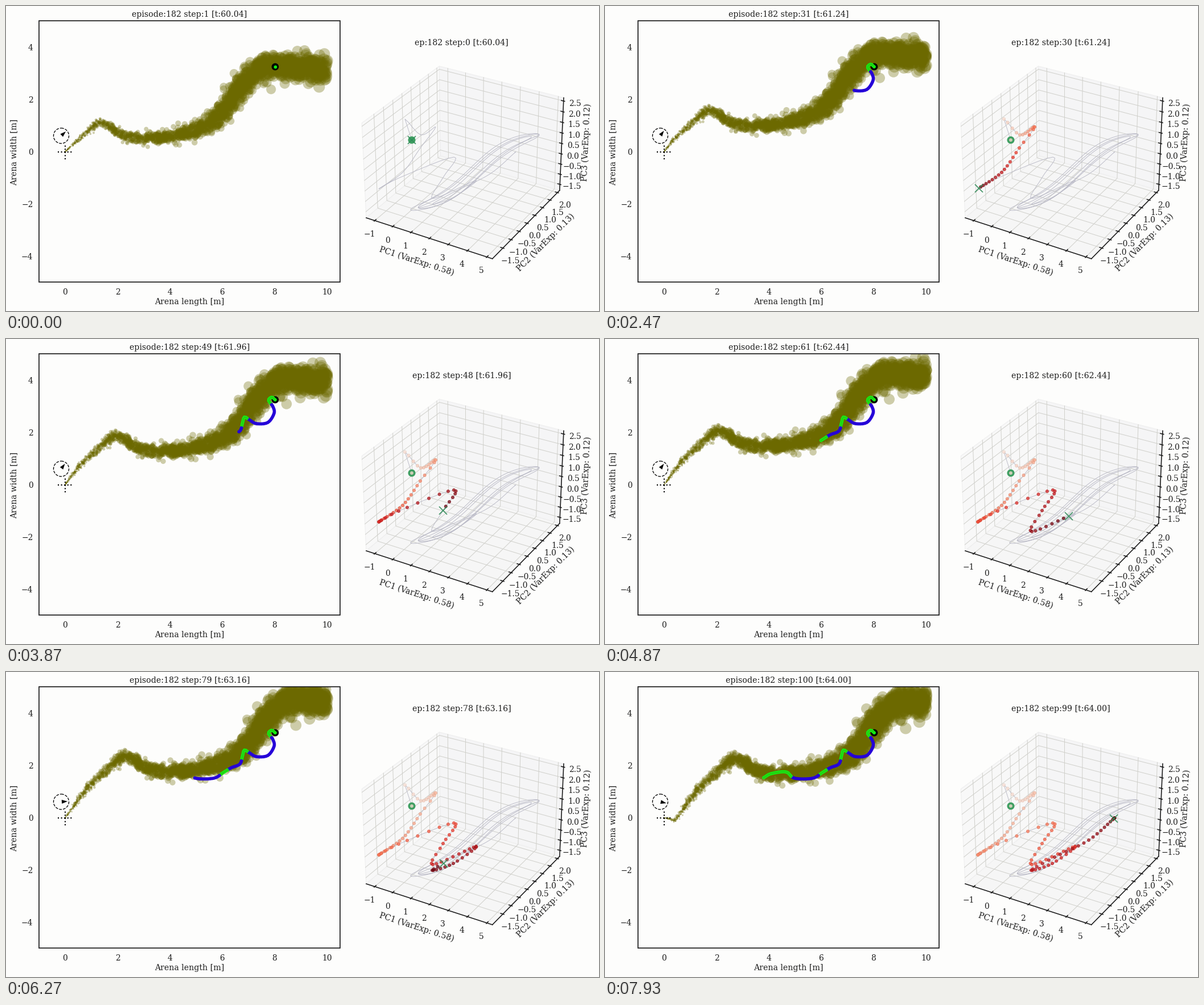
Write a matplotlib script that moves like this. It is 1042 px wide and 537 px high and loops after 8000 ms.

```python
import numpy as np
import matplotlib.pyplot as plt
from matplotlib.animation import FuncAnimation
from matplotlib.patches import Circle, Polygon, Rectangle

W, H, DPI = 1042, 537, 100
STEPS = 100
INK = "#1c1c1c"
GREEN, BLUE = "#12f212", "#2400dc"
SPEED = 0.925                      # wind, pixels per step
ORIGIN = np.array([104.0, 256.5])

plt.rcParams["font.family"] = "DejaVu Serif"
fig = plt.figure(figsize=(W / DPI, H / DPI), dpi=DPI, facecolor="#fdfdfc")
ax = fig.add_axes([0, 0, 1, 1])
ax.set_xlim(0, W)
ax.set_ylim(H, 0)
ax.axis("off")


def pt(px):
    return px * 72 / DPI


def area(radius):
    return pt(2 * np.asarray(radius, float)) ** 2


def label(x, y, s, px=14.1, **kw):
    opts = dict(ha="center", va="center", color=INK, zorder=20)
    opts.update(kw)
    return ax.text(x, y, s, fontsize=pt(px), **opts)


def tick_label(x, y, s, **kw):
    label(x, y + 1.4, s.replace("-", "\u2212"), 13.9, **kw)


def line(points, color, px, **kw):
    points = np.asarray(points)
    return ax.plot(points[:, 0], points[:, 1], color=color, lw=pt(px), **kw)[0]


def lerp(x, xs, points):
    """Linear interpolation of each column of points."""
    return np.column_stack([np.interp(x, xs, col) for col in np.transpose(points)])


def smooth(points, m=12):
    """Catmull-Rom curve through the points."""
    p = np.array(points, float)
    p = np.vstack([2 * p[0] - p[1], p, 2 * p[-1] - p[-2]])
    t = np.linspace(0, 1, m, endpoint=False)[:, None]
    parts = [0.5 * (2 * b + (c - a) * t + (2 * a - 5 * b + 4 * c - d) * t**2
                    + (3 * b - a - 3 * c + d) * t**3)
             for a, b, c, d in zip(p, p[1:], p[2:], p[3:])]
    return np.vstack(parts + [p[-2:-1]])


# ---- arena ----
arena = Rectangle((58, 26), 529, 460, fill=False, ec=INK, lw=pt(1.7), zorder=15)
ax.add_patch(arena)
for v in range(0, 11, 2):
    tick_label(104 + 46 * v, 503, str(v))
for v in range(-4, 5, 2):
    tick_label(47.5, 256.5 - 46 * v, str(v), ha="right")
label(322.5, 520.5, "Arena length [m]")
label(14.5, 257, "Arena width [m]", rotation=90)
title = label(322.5, 15, "")

line([(91, 257), (118, 257)], "black", 2.1, ls=":", zorder=6)
line([(104, 270), (104, 243)], "black", 2.1, ls=":", zorder=6)
HUB = np.array([97, 228.5])
ax.add_patch(Circle(HUB, 13.5, fill=False, ec="black", lw=pt(1.3), ls="--", zorder=6))
arrow = Polygon([(0, 0)] * 3, closed=True, color="black", lw=0, zorder=7)
ax.add_patch(arrow)

# ---- wind: heading in degrees against distance blown, zero at the first step ----
BLOWN = [-560, -445, -420, -395, -330, -300, -270, -225, -190, -142, -126, -88,
         -72, 0, 9, 72, 72.2]
HEADING = [-8, -3, 20, 51, 52, 46, 24, 13, 2, -2, -33, -30, 40, 43, 53, 54, -13]


def heading(blown):
    a = np.radians(np.interp(blown, BLOWN, HEADING))
    return np.stack([np.cos(a), -np.sin(a)], axis=-1)


grid = np.arange(-600, 96, 0.5)
drift = np.cumsum(0.5 * heading(grid), axis=0)

# ---- plume: each puff is carried from the origin by all wind since its release ----
rng = np.random.default_rng(182)
release = rng.uniform(grid[0], STEPS * SPEED, 2600)
jitter = np.clip(rng.normal(size=(release.size, 2)), -2.9, 2.9)
release = np.r_[release, -436, -460]            # two stray puffs
jitter = np.vstack([jitter, (0, 4.3), (0, 3.1)])
origin_drift = lerp(release, grid, drift)

puffs = ax.scatter([], [], color="#6c6900", alpha=0.33, linewidths=0, zorder=2)
puffs.set_clip_path(arena)


def plume(n):
    dist = n * SPEED - release
    age = np.maximum(dist, 0)
    pos = (ORIGIN + lerp([n * SPEED], grid, drift) - origin_drift
           + jitter * (0.2 * age**0.64)[:, None])
    show = (dist >= 0) & (pos[:, 0] < 564.5) & (pos[:, 1] > 26)
    return pos[show], area(0.9 + 0.0175 * age[show])


# ---- agent: constant speed along a curve ----
walk = smooth([(473, 107), (467, 102.5), (461.5, 108), (469, 119), (471, 131),
               (460, 147), (440, 149), (428, 142.5), (419, 137.5), (415.5, 148),
               (411, 162), (396, 168.5), (382, 177), (365, 187), (333, 187),
               (318, 176), (292, 179), (279, 186)])
travelled = np.r_[0, np.cumsum(np.hypot(*np.diff(walk, axis=0).T))]
agent = lerp(np.linspace(0, travelled[-1], STEPS), travelled, walk)
in_odor = np.searchsorted([9.5, 36.5, 45, 56.5, 62, 80.5],
                          np.arange(1, STEPS + 1)) % 2 == 0
ax.add_patch(Circle(agent[0], 6.3, color="black", lw=0, zorder=8))
trail = ax.scatter([], [], s=area(2.9), linewidths=0, zorder=9)
core = ax.scatter([], [], s=area(0.9), linewidths=0, zorder=10)
trail_color = np.where(in_odor, GREEN, BLUE)
core_color = np.where(in_odor, "#3f9d12", "#2a0ccc")

# ---- 3D box, seen from elevation 30 and azimuth -60 ----
LO, HI = np.array([-1.48, -2.12, -1.80]), np.array([5.28, 2.15, 2.65])
BOX = np.array([4, 4, 3]) * 0.28571
el, az = np.radians([30, -60])
RIGHT = np.array([-np.sin(az), np.cos(az), 0])
UP = np.array([-np.sin(el) * np.cos(az), -np.sin(el) * np.sin(az), np.cos(el)])
EYE = np.array([np.cos(el) * np.cos(az), np.cos(el) * np.sin(az), np.sin(el)])


def project(u):
    """Unit-cube points to pixels."""
    q = (np.asarray(u, float) - 0.5) * BOX
    f = 10 / (10 - q @ EYE)
    return np.stack([805.9 + 222.3 * (q @ RIGHT) * f,
                     267.6 - 222.2 * (q @ UP) * f], axis=-1)


def at(axis, t, fixed):
    u = np.array(fixed, float)
    u[axis] = t
    return u


# pane normal, its position, shade
for axis, side, shade in [(0, 0, "#f8f8f8"), (1, 1, "#f5f5f6"), (2, 0, "#f6f6f6")]:
    square = [(0, 0), (0, 1), (1, 1), (1, 0)]
    corners = [np.insert(np.array(c, float), axis, side) for c in square]
    ax.add_patch(Polygon(project(corners), fc=shade, ec="#eeeeee", lw=pt(1), zorder=1))

# axis, ticks, grid corners, edge base, tick direction, label offset, format
AXES = [
    (0, np.arange(-1, 6), [(0, 0, 0), (0, 1, 0), (0, 1, 1)], (0, 0, 0), 1,
     (-9.5, 23), "{:.0f}"),
    (1, np.arange(-1.5, 2.1, 0.5), [(1, 0, 0), (0, 0, 0), (0, 0, 1)], (1, 0, 0), 0,
     (13, 21), "{:.1f}"),
    (2, np.arange(-1.5, 2.6, 0.5), [(0, 0, 0), (0, 1, 0), (1, 1, 0)], (1, 1, 0), 0,
     (20.5, 3), "{:.1f}"),
]
for axis, ticks, mesh, edge, tdir, (dx, dy), fmt in AXES:
    line(project([at(axis, 0, edge), at(axis, 1, edge)]), INK, 1.6, zorder=4)
    sign = -1 if edge[tdir] else 1
    for v in ticks:
        t = (v - LO[axis]) / (HI - LO)[axis]
        line(project([at(axis, t, g) for g in mesh]), "#d0d0cb", 1.0, zorder=2)
        p = at(axis, t, edge)
        d = at(tdir, sign / 12, (0, 0, 0))
        line(project([p + 0.2 * d, p - 0.1 * d]), INK, 1.6, zorder=4)
        x, y = project(p)
        tick_label(x + dx, y + dy, fmt.format(v))

label(721.5, 449.5, "PC1 (VarExp: 0.58)", rotation=-18)
label(948, 416, "PC2 (VarExp: 0.13)", rotation=45)
label(1020, 240, "PC3 (VarExp: 0.12)", rotation=87.5)
title3d = label(800.5, 65, "")

# ---- neural state: turning points as step, x, y ----
turns = smooth([(0, 713, 236), (1, 701, 199), (5, 729, 227), (12, 755, 213),
                (16, 728, 250), (22, 697, 293), (31, 655, 322), (36, 690, 303),
                (42, 787, 266), (48, 768, 302), (53, 750, 339), (62, 826, 307),
                (69, 786, 337), (75, 749, 349), (80, 790, 326), (86, 850, 296),
                (93, 892, 260), (99, 894, 258)])
state = lerp(np.arange(STEPS), turns[:, 0], turns[:, 1:])

# the rest of the episode: slow laps between two far ends of the box
theta = np.linspace(0, 6 * np.pi, 400)
along = 0.5 - 0.5 * np.cos(theta) * (0.93 + 0.07 * np.cos(theta / 3))
sag = 3 + 10 * np.sin(2 * np.pi * along) + (8 + 4 * np.sin(0.37 * theta)) * np.sin(theta)
laps = np.column_stack([710 + 230 * along + 0.4 * sag, 356 - 134 * along + sag])
for path in (state, laps):
    line(path, "#b9b9c6", 0.9, zorder=3)

ax.add_patch(Circle(state[0], 6.5, color="#3f9f62", lw=0, zorder=11))
dots = ax.scatter([], [], s=area(2.5), linewidths=pt(1), alpha=0.72, zorder=12)
cross, = ax.plot([], [], "x", color="#2e8b57", ms=pt(13.5), mew=pt(1.7),
                 alpha=0.9, zorder=13)


def update(n):
    clock = f"[t:{60.04 + 0.04 * n:.2f}]"
    title.set_text(f"episode:182 step:{n + 1} {clock}")
    title3d.set_text(f"ep:182 step:{n} {clock}")

    pos, sizes = plume(n)
    puffs.set_offsets(pos)
    puffs.set_sizes(sizes)

    ahead = heading(n * SPEED)
    side = 3.4 * np.array([-ahead[1], ahead[0]])
    arrow.set_xy([HUB + 11 * ahead, HUB + ahead + side, HUB + ahead - side])

    trail.set_offsets(agent[:n + 1])
    trail.set_facecolor(trail_color[:n + 1])
    core.set_offsets(agent[1:n + 1])
    core.set_facecolor(core_color[1:n + 1])

    dots.set_offsets(state[:n])
    shades = plt.cm.Reds(0.1 + 0.9 * np.arange(n) / max(n, 1))
    dots.set_facecolor(shades)
    dots.set_edgecolor(shades * [0.9, 0.9, 0.9, 1])
    cross.set_data([state[n, 0]], [state[n, 1]])
    return title, title3d, puffs, arrow, trail, core, dots, cross


anim = FuncAnimation(fig, update, frames=STEPS, interval=80, repeat=True,
                     repeat_delay=0, blit=False)
plt.show()
```
